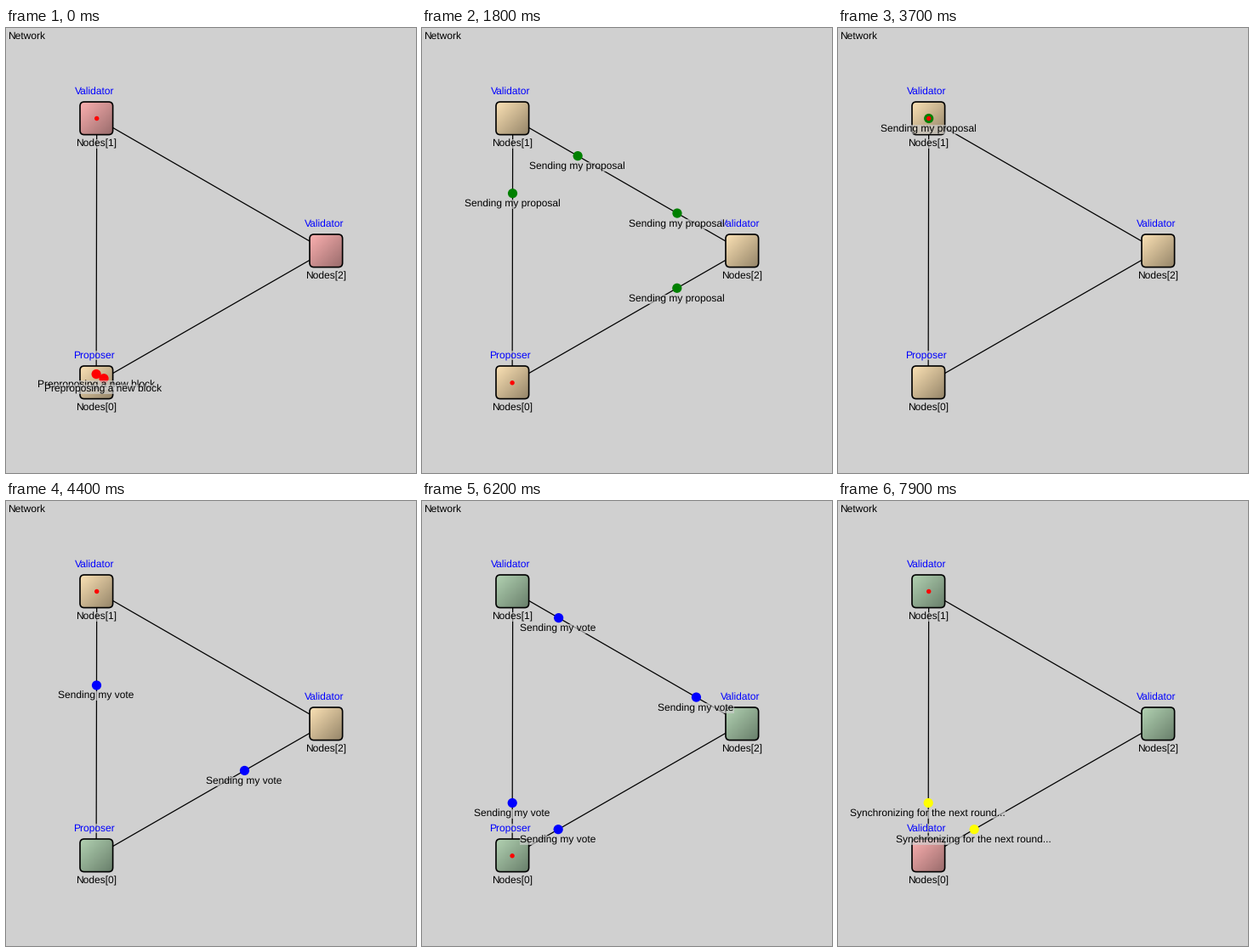
Recreate the animation shown at these times as a matplotlib script. Size 482 by 524 pixels, loop 8000 ms.

```python
import numpy as np
import matplotlib.pyplot as plt
from matplotlib.animation import FuncAnimation
from matplotlib.patches import Circle, FancyBboxPatch

W, H, STEP, FRAMES = 482, 524, 100, 80
BG = "#d0d0d0"
A, B, C = 1, 2, 0
POS = {A: (106.7, 106.5), B: (376.4, 262.2), C: (106.1, 417.8)}

PINK = ((255, 178, 178), (152, 107, 107))
TAN = ((254, 228, 182), (148, 132, 104))
GREEN = ((180, 212, 180), (104, 126, 106))

# Fill of each node from a given time on
FILLS = {
    A: [(0, PINK), (1247, TAN), (5035, GREEN)],
    B: [(0, PINK), (1507, TAN), (5316, GREEN)],
    C: [(0, TAN), (3755, GREEN), (7700, PINK)],
}
ROLES = {
    A: [(0, "Validator")],
    B: [(0, "Validator")],
    C: [(0, "Proposer"), (7700, "Validator")],
}
# Node that handles the next event
ACTIVE = [(0, A), (1247, B), (1507, C), (2840, B), (3140, C), (3440, A),
          (5035, B), (5316, C), (6740, B), (7060, C), (7380, A)]


def broadcast(start, first, second, text, color):
    """Node 0 sends to both others; each message waits until handled."""
    return [(C, A, start, start, 1000, first, text, color),
            (C, B, start, start, 1000, second, text, color)]


def relay(ready, start, span, ends, text, color):
    """Nodes 1 and 2 answer; arrivals are handled one after another."""
    routes = [(A, C, ready), (A, B, ready), (B, C, start), (B, A, start)]
    return [(src, dst, show, start, span, end, text, color)
            for (src, dst, show), end in zip(routes, ends)]


MESSAGES = (
    broadcast(-33, 1247, 1507, "Preproposing a new block", "#ff0000")
    + relay(1247, 1507, 1034, (2840, 3140, 3440, 3755),
            "Sending my proposal", "#008000")
    + broadcast(3755, 5035, 5316, "Sending my vote", "#0000ff")
    + relay(5035, 5316, 1105, (6740, 7060, 7380, 7700),
            "Sending my vote", "#0000ff")
    + broadcast(7700, 9000, 9300, "Synchronizing for the next round...",
                "#ffff00")
)


def at(steps, t):
    return [value for since, value in steps if since <= t][-1]


def gradient(colors):
    u = np.linspace(0, 1, 40)
    mix = ((u[:, None] + u[None, :]) / 2)[..., None]
    light, dark = (np.array(c) / 255 for c in colors)
    return light * (1 - mix) + dark * mix


plt.rcParams["font.family"] = "Liberation Sans"
plt.rcParams["text.hinting"] = "none"
fig = plt.figure(figsize=(W / 100, H / 100), dpi=100, facecolor=BG)
ax = fig.add_axes([0, 0, 1, 1])
ax.axis("off")


def label(x, y, text, color="black", z=4, ha="center"):
    box = dict(facecolor=BG, edgecolor="none", alpha=0.65, pad=0)
    return ax.text(x, y + 4.3, text, color=color, fontsize=8.64, ha=ha,
                   va="baseline", zorder=z, bbox=box)


for p, q in ((A, B), (B, C), (C, A)):
    ax.plot(*zip(POS[p], POS[q]), color="black", lw=0.9, zorder=1, snap=False)
ax.plot([0, W], [523.5, 523.5], color="#a0a0a0", lw=0.72, zorder=1)
label(2, 9, "Network", ha="left")

fills, roles = {}, {}
for n, pos in POS.items():
    x, y = (int(v) + 0.3 for v in pos)
    frame = FancyBboxPatch((x - 19.3, y - 19.3), 38.6, 38.6, fc="none",
                           ec="black", lw=1.2, zorder=3,
                           boxstyle="round,pad=0,rounding_size=5")
    fills[n] = ax.imshow(gradient(TAN), zorder=2, aspect="auto",
                         extent=(x - 20, x + 20, y + 20, y - 20))
    ax.add_patch(frame)
    fills[n].set_clip_path(frame)
    roles[n] = label(x - 2.6, y - 33, "Validator", "#0000ff")
    label(x - 0.3, y + 29, f"Nodes[{n}]")

ax.set_xlim(0, W)
ax.set_ylim(H, 0)

balls, notes = [], []
for i, (*_, text, color) in enumerate(MESSAGES):
    balls.append(ax.add_patch(Circle((0, 0), 5.6, fc=color, lw=0,
                                     zorder=5 + i / 100)))
    notes.append(label(0, 0, text, z=7 + i / 100))
marker = ax.add_patch(Circle((0, 0), 2.7, fc="#ff0000", lw=0, zorder=6))


def update(i):
    t = i * STEP
    for n in POS:
        fills[n].set_data(gradient(at(FILLS[n], t)))
        roles[n].set_text(at(ROLES[n], t))
    for ball, note, msg in zip(balls, notes, MESSAGES):
        src, dst, show, start, span, end = msg[:6]
        on = show <= t < end
        ball.set_visible(on)
        note.set_visible(on)
        k = min(max((t - start) / span, 0), 1)
        x, y = (p + (q - p) * k for p, q in zip(POS[src], POS[dst]))
        ball.center = (x, y)
        note.set_position((x - 0.5, y + 16))
    marker.center = POS[at(ACTIVE, t)]
    return [*fills.values(), *roles.values(), *balls, *notes, marker]


anim = FuncAnimation(fig, update, frames=FRAMES, interval=STEP, repeat=True,
                     repeat_delay=0, blit=False)
plt.show()
```
